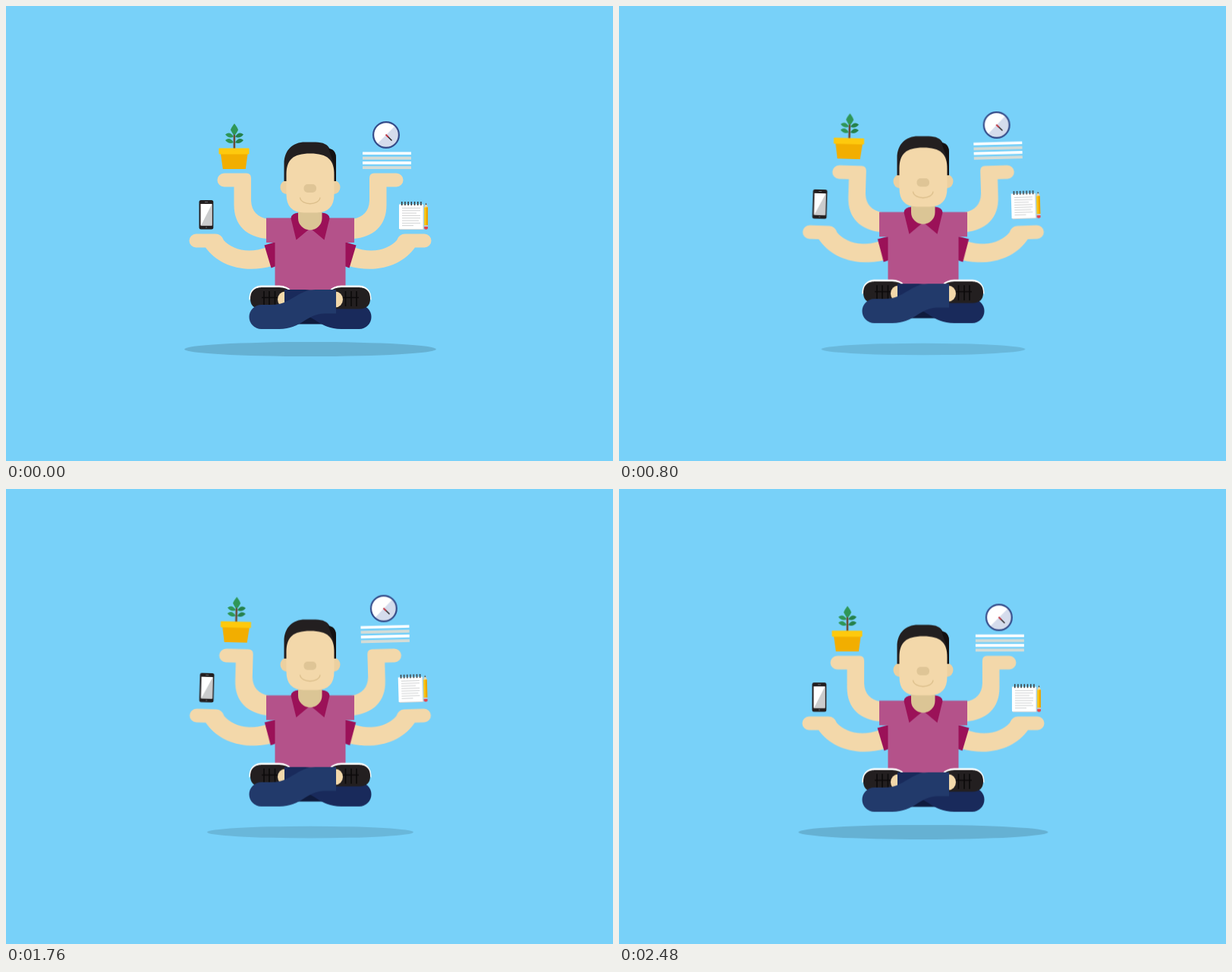
An HTML page that plays this animation: 800x600 px, repeating every 2520 ms.

```html
<!DOCTYPE html>
<html lang="en">
<head>
<meta charset="utf-8">
<title>Floating multitasker</title>
<style>
  html, body { margin: 0; width: 100%; height: 100%; overflow: hidden; background: #78d1f9; }
  svg { display: block; width: 800px; height: 600px; }
  .skin { fill: #f3d8aa; }
  .shade { fill: #dbc595; }
  .trim { fill: #9b1158; }
  .black { fill: #231f20; }
</style>
</head>
<body>
<svg viewBox="0 0 800 600">
  <defs>
    <g id="arms">
      <path class="skin upper" d="M287.5 220.5H317Q323 220.5 323 227V257Q324 277 345 281V307C318 305 300.5 290 300.5 262V238.5H287.5A9 9 0 0 1 287.5 220.5Z"/>
      <g class="lower">
        <path class="skin" d="M250.5 300.5H276Q284 300.5 287 309C297 320 318 328 344 318L352 342.5C312 354 279 341 263 318.5H250.5A9 9 0 0 1 250.5 300.5Z"/>
        <path class="trim" d="M340.5 315.5L356 311V343L349.5 345.5Z"/>
      </g>
    </g>
    <g id="shoe">
      <path fill="#fff" d="M320.5 388C320 374 328 368.5 338 368.5H360Q371 369 375.5 375L372 378H330Z"/>
      <path class="black" d="M322 386C322 374 330 371 338 371H360Q370 371.500 374.500 376V399.500H336Q322 399 322 386Z"/>
      <path d="M340 376V396M347 376V396M354.500 376V396M337 384.500H358" fill="none" stroke="#0c0a0b" stroke-width="1.6"/>
      <path class="skin" d="M368 376.500A10 10.500 0 0 0 368 397.500Z"/>
    </g>
    <path id="leg" d="M336.500 426H360C390 426 396 405.500 420 405.500H435V374H408C384 374 376 394 350 394H336.500A16 16 0 0 0 336.500 426Z"/>
  </defs>

  <ellipse id="shadow" cx="401" cy="452.500" rx="166" ry="9.600"/>

  <g id="body">
    <g id="left"></g>
    <g id="right" transform="translate(802 0) scale(-1 1)"></g>
    <path fill="#b4528a" d="M343 279.500H459V312H447.500V376H354.500V312H343Z"/>
    <path class="trim" d="M386 272.500Q376 273 375.500 280L382.500 308.500L401 293L419.500 308.500L426.500 280Q426 273 416 272.500Z"/>
    <path class="shade" d="M385 262H416.500V279.700A15.750 15.750 0 0 1 385 279.700Z"/>

    <ellipse cx="369.500" cy="239" rx="8" ry="9" fill="#ecd0a0"/>
    <ellipse cx="432.500" cy="239" rx="8" ry="9" fill="#ecd0a0"/>
    <path class="black" d="M366.500 231V208C366.500 190 378 179.500 394 179.500H408C418 179.500 424 183 426.500 188Q435 190 435 201V231Z"/>
    <path fill="#141112" d="M425 188Q435 189 435 201V231H432V208Z"/>
    <path class="skin" d="M369.500 222C369.500 203 378 194.500 401 194.500S432.500 203 432.500 222V248Q432.500 272.500 409 272.500H393Q369.500 272.500 369.500 248Z"/>
    <rect x="392.500" y="235" width="16.500" height="11" rx="5" fill="#dfc596"/>
    <path d="M387.500 252.500C389 263.500 412.500 263.500 414 252.500" fill="none" stroke="#dcbf8c" stroke-width="1.400"/>

    <path fill="#0f1b3d" d="M380 419.500L401 400L422 419.500Z"/>
    <use href="#shoe"/>
    <use href="#leg" fill="#192a5b" transform="translate(802 0) scale(-1 1)"/>
    <use href="#shoe" transform="translate(802 0) scale(-1 1)"/>
    <use href="#leg" fill="#223a6b"/>
  </g>

  <g id="plant">
    <path fill="#6b4a35" d="M299.600 166H302.200V188H299.600Z"/>
    <g fill="#2f9657">
      <path d="M301 155Q305 160 306 163.500Q304 168 301 170.500Q298 168 296 163.500Q297 160 301 155Z"/>
      <path id="leaf" d="M300 172.500Q295 164.500 289 169.500Q294 175.500 300 172.500Z"/>
      <use href="#leaf" y="7.500"/>
      <g fill="#25814b" transform="translate(602 0) scale(-1 1)">
        <use href="#leaf"/>
        <use href="#leaf" y="7.500"/>
      </g>
    </g>
    <path fill="#f2ae00" d="M283 195H318.500L315.800 215H285.800Z"/>
    <rect x="280.500" y="187.500" width="40" height="8" rx=".8" fill="#fec90d"/>
  </g>

  <g id="desk">
    <path d="M470 194.300H534M470 206.900H534" stroke="#fff" stroke-width="3.600"/>
    <path d="M470 200.600H534M470 213.100H534" stroke="#d5dcd6" stroke-width="3.600"/>
    <circle cx="501" cy="170" r="17" fill="#fff"/>
    <path fill="#d5dcec" d="M513 158A17 17 0 0 1 489 182Z"/>
    <circle cx="501" cy="170" r="16.900" fill="none" stroke="#344b89" stroke-width="2.200"/>
    <path d="M502.500 171.500L508.500 177.500" stroke="#231f20" stroke-width="1.400"/>
    <path d="M500.500 169.500L504 173" stroke="#c1343f" stroke-width="1.800"/>
  </g>

  <g id="phone">
    <rect class="black" x="254.500" y="256" width="18.800" height="38.500" rx="2.500"/>
    <path fill="#fff" d="M256.500 261H271.500V289.500H256.500Z"/>
    <path fill="#cbcccd" d="M271.500 261V289.500H257Z"/>
    <path d="M262 258.500H266M263 292H265" stroke="#66676a" stroke-width="1"/>
  </g>

  <g id="pad">
    <path fill="#d3d6d6" d="M519 262H550.500V295H519Z"/>
    <path fill="#fff" d="M518 261.500H549.500V294H518Z"/>
    <path d="M521 260.500H549" stroke="#333" stroke-width="5" stroke-dasharray="1.500 2.700"/>
    <path d="M522 266.500H546M522 269.800H546M522 273.100H541M522 276.400H546M522 279.700H546M522 283H544M522 286.300H546M522 289.600H537" stroke="#cfd1d2" stroke-width="1"/>
    <path fill="#efd5a5" d="M553.600 259.500L556 266H551.200Z"/>
    <path fill="#333" d="M553.600 259.500L554.500 262H552.700Z"/>
    <path fill="#ffc50e" d="M551.200 265.500H556V290H551.200Z"/>
    <path fill="#eba400" d="M553.800 265.500H556V290H553.800Z"/>
    <path fill="#c4c7c9" d="M551.200 289H556V291H551.200Z"/>
    <path fill="#e5434d" d="M551.200 291H556V293.500Q553.600 296 551.200 293.500Z"/>
  </g>
</svg>
<script>
  const arms = document.getElementById('arms');
  for (const side of ['left', 'right'])
    for (const part of arms.children)
      document.getElementById(side).append(part.cloneNode(true));
  arms.remove();

  // selector, pivot x, pivot y, rise x, rise y, tilt in degrees
  const moves = [
    ['#body', 0, 0, 0, -12.25, 0],
    ['.upper', 380, 320, 0, 0, 2.67],
    ['.lower', 352, 325, 0, 0, 3.2],
    ['#plant', 301, 187, 4.2, -21, 2.3],
    ['#desk', 502, 203, -3.9, -20.6, -2.3],
    ['#phone', 264, 275, 1.2, -22, 2.7],
    ['#pad', 536, 277, -1.4, -22.6, -2.7]
  ];
  const timing = { duration: 1260, iterations: Infinity, direction: 'alternate', easing: 'linear' };
  const pose = (x, y, turn) => ({ transform: `translate(${x}px, ${y}px) rotate(${turn}deg)` });

  for (const [selector, px, py, x, y, turn] of moves)
    for (const el of document.querySelectorAll(selector)) {
      el.style.transformOrigin = `${px}px ${py}px`;
      el.animate([pose(0, 0, 0), pose(x, y, turn)], timing);
    }

  const shadow = document.getElementById('shadow');
  shadow.style.transformOrigin = '401px 452.5px';
  shadow.animate([
    { transform: 'scale(1)', opacity: .155 },
    { transform: 'scale(.7)', opacity: .1 }
  ], timing);
</script>
</body>
</html>
```
